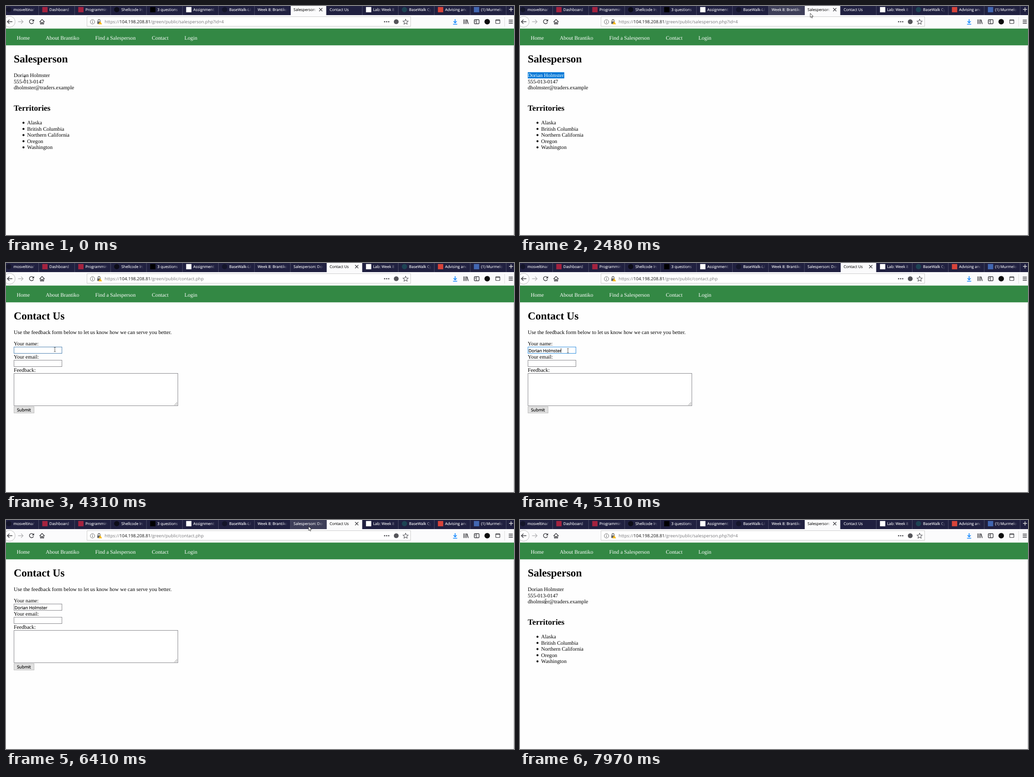
Recreate the animation shown at these times as an HTML page. Size 1113 px wide and 503 px high, loop 8000 ms.

```html
<!DOCTYPE html>
<html lang="en">
<head>
<meta charset="utf-8">
<title>Browser session</title>
<style>
  html, body { margin: 0; width: 100%; height: 100%; overflow: hidden; background: #fefefe; }
  svg { display: block; text-rendering: geometricPrecision; }
  .ui { font-family: "Open Sans", "Noto Sans", sans-serif; }
  .form { font-size: 9.25px; stroke: #000; stroke-width: .2; }
  .page { font: 11.73px "Liberation Serif", "Times New Roman", serif; }
  .h1 { font-size: 23.46px; font-weight: bold; }
  .h2 { font-size: 17.6px; font-weight: bold; }
  .line { fill: none; stroke: #38383d; stroke-width: 1.4; }
</style>
</head>
<body>
<svg width="1113" height="503" viewBox="0 0 1113 503">
  <defs>
    <linearGradient id="fade" gradientUnits="userSpaceOnUse" x1="60" x2="72">
      <stop stop-color="#fff"/><stop offset="1" stop-color="#fff" stop-opacity="0"/>
    </linearGradient>
    <linearGradient id="fadeActive" gradientUnits="userSpaceOnUse" x1="48" x2="57">
      <stop stop-color="#111"/><stop offset="1" stop-color="#111" stop-opacity="0"/>
    </linearGradient>
  </defs>
  <rect width="1113" height="503" fill="#fefefe"/>
  <rect width="1113" height="20" fill="#202040"/>
  <g id="tabs" class="ui" font-size="8.35"></g>
  <path d="M1102 7.5h9M1106.5 3v9" class="line" style="stroke:#ddd"/>
  <rect y="20" width="1113" height="30" fill="#fbfbfc"/>

  <!-- navigation buttons -->
  <circle cx="8" cy="34.5" r="12" fill="#fff" stroke="#bbb"/>
  <path d="M14 34.5H3M7.5 30L3 34.5L7.5 39" class="line"/>
  <path d="M26.5 34.5h11M33 30l4.5 4.5l-4.5 4.5" class="line" style="stroke:#b5b5b8"/>
  <path d="M59.6 31.4a4.6 4.6 0 1 0 .8 4.2" class="line"/>
  <path d="M61.5 29v4.7h-4.7z" fill="#38383d"/>
  <path d="M73.5 35L79 29.5L84.5 35M75.5 34v5.5h2.5v-3.5h2v3.5h2.5V34" class="line"/>

  <!-- address bar -->
  <rect x="177.5" y="23.5" width="709" height="21" fill="#fff" stroke="#ccc"/>
  <circle cx="189.5" cy="34.8" r="4.8" class="line" style="stroke:#666;stroke-width:1"/>
  <path d="M189.5 34v3.5M189.5 31.8v1.2" class="line" style="stroke:#666;stroke-width:1.2"/>
  <path d="M201.5 34v-2a2.3 2.3 0 0 1 4.6 0v2" class="line" style="stroke:#666"/>
  <rect x="200" y="34" width="7.5" height="5.5" fill="#666"/>
  <path d="M206.5 33.5l4 6.8h-8z" fill="#f6b91c"/>
  <g fill="#55555a">
    <circle cx="829.5" cy="34.5" r="1.5"/><circle cx="834" cy="34.5" r="1.5"/><circle cx="838.5" cy="34.5" r="1.5"/>
    <circle cx="855" cy="34.5" r="5.3"/>
  </g>
  <path d="M875.5 29l1.7 3.7l4 .5l-3 2.7l.8 4l-3.5-2l-3.5 2l.8-4l-3-2.7l4-.5z" class="line" style="stroke:#55555a;stroke-width:1.1"/>
  <g id="address" class="ui" font-size="9.61"></g>

  <!-- toolbar buttons -->
  <path d="M984 29v7.5M980.5 33.5l3.5 3.5l3.5-3.5M979.5 40h9" class="line" style="stroke:#0a84ff;stroke-width:1.6"/>
  <path d="M1003 29.5v10M1006 29.5v10M1009 29.5v10M1010 30l3 9.5" class="line"/>
  <rect x="1026" y="30" width="10.5" height="9" rx="1.5" class="line"/>
  <path d="M1030.8 30v9M1027.5 32.5h2M1027.5 34.8h2" class="line" style="stroke-width:1.1"/>
  <circle cx="1054.3" cy="34.5" r="6" fill="#0c0c0d"/>
  <rect x="1073" y="30" width="9" height="8.5" rx="1" class="line" style="stroke-width:1.2"/>
  <path d="M1073 31.5h9" class="line"/>
  <path d="M1092.5 24v21" stroke="#ddd"/>
  <path d="M1101.5 31h9M1101.5 34.5h9M1101.5 38h9" class="line"/>

  <rect y="49.6" width="1113" height="36.8" fill="#338844"/>
  <g id="menu" class="page" fill="#fff"></g>
  <g id="content" class="page"></g>
  <path d="M1112.5 86.4V503" stroke="#c9c9cc"/>
  <g id="cursor"></g>
</svg>
<script>
const LOOP = 8000;
const PERSON = 'Dorian Holmster';
const TAB_WIDTH = 78.8, TAB_ORIGIN = -7.3;
const SALES_TAB = 8, CONTACT_TAB = 9;

// Title, icon colour, icon shape
const TABS = [
  ['mosveltina/', '#14152a', 'circle'], ['Dashboard', '#a5233f', 'square'],
  ['Programming', '#a5233f', 'square'], ['Shellcode Inj', '#0d0d18', 'circle'],
  ['3 questions t', '#000', 'square'], ['Assignment: W', '#fff', 'square'],
  ['BaseWalk-Lib', '#14152a', 'circle'], ['Week 8: Brantiko'],
  ['Salesperson: Dorian'], ['Contact Us'],
  ['Lab: Week 8:', '#fff', 'square'], ['BaseWalk Cy', '#1d4454', 'circle'],
  ['Advising and', '#d8443a', 'square'], ['(1) Murmelon', '#4267b2', 'square'],
  ['']
];

// Time, pointer x, pointer y, pointer shape, hovered tab
const POINTER = [
  [0, 41, 158.5, 'beam'], [130, 34, 158], [260, 26, 157], [390, 20, 156], [520, 17.5, 155],
  [780, 42, 154], [910, 79, 153.5], [1040, 87, 155], [1170, 89, 158],
  [1430, 96, 157], [1560, 102, 156],
  [2220, 240, 110, 'arrow'], [2350, 575, 12, 'arrow', 7], [2480, 636, 16, 'arrow', 7],
  [2610, 850, 14, 'arrow', 10], [2740, 998, 20, 'arrow', 12], [2870, 890, 10, 'arrow', 11],
  [3000, 750, 8, 'arrow', 9], [3130, 742, 8, 'arrow'],
  [3260, 640, 45, 'arrow'], [3390, 430, 108, 'arrow'], [3520, 240, 160, 'arrow'],
  [3650, 145, 180, 'arrow'], [3780, 110, 187, 'beam'],
  [4310, 107, 190, 'beam'], [4440, 105, 192.5, 'beam'],
  [5630, 190, 150, 'arrow'], [5760, 420, 95, 'arrow'], [5890, 700, 40, 'arrow'],
  [6020, 950, 24, 'arrow'], [6150, 1050, 18, 'arrow'], [6280, 820, 10, 'arrow', 10],
  [6410, 663, 14, 'arrow', 8], [6540, 663, 14, 'arrow'],
  [6800, 260, 130, 'arrow'], [6930, 2, 228, 'arrow'],
  [7190, 5, 220, 'arrow'], [7320, 9, 206, 'arrow'], [7450, 13, 190, 'arrow'],
  [7580, 19, 181, 'beam'], [7840, 38, 180, 'beam'], [7970, 56, 178.5, 'beam']
];

// Time and right edge of the text selection
const SELECTION = [[0, 17], [780, 26], [910, 66], [1040, 84], [1170, 90], [1560, 97], [7840, 17]];

const byId = id => document.getElementById(id);
const latest = (steps, t) => steps.filter(step => step[0] <= t).pop();
const text = (x, y, s, attrs = '') => `<text x="${x}" y="${y}" ${attrs}>${s}</text>`;
const box = (x, y, w, h, fill, stroke = 'none') =>
  `<rect x="${x}" y="${y}" width="${w}" height="${h}" fill="${fill}" stroke="${stroke}"/>`;

function drawTabs(active, hovered) {
  return TABS.map(([title, colour, shape], i) => {
    const isActive = i === active;
    const icon = shape === 'circle' ? `<circle cx="13.5" cy="8" r="5.8" fill="${colour}"/>`
      : shape ? box(8, 2.2, 11.6, 11.6, colour) : '';
    const back = isActive ? box(0.7, 0, TAB_WIDTH - 0.7, 20, '#fbfbfc')
      : i === hovered ? box(0, 0, TAB_WIDTH, 20, '#3d3e58') : '';
    const close = isActive
      ? '<path d="M63 4.5l7 7M70 4.5l-7 7" class="line" style="stroke-width:1.2"/>' : '';
    const edge = isActive ? '' : box(-0.4, 0, 0.8, 20, '#5b5c74');
    const ink = `url(#fade${isActive ? 'Active' : ''})`;
    return `<g transform="translate(${TAB_ORIGIN + TAB_WIDTH * i})">${back}${edge}${icon}${close}` +
      text(shape ? 23.6 : 7, 11.2, title, `fill="${ink}" stroke="${ink}" stroke-width=".12"`) + '</g>';
  }).join('');
}

function drawAddress(file) {
  return text(216, 38.3,
    `https://<tspan fill="#111">104.198.208.81</tspan>/green/public/${file}`, 'fill="#77777a"');
}

function drawSalesPage(selectionEnd) {
  const lines = [PERSON, '555-013-0147', 'dholmster@traders.example'];
  const places = ['Alaska', 'British Columbia', 'Northern California', 'Oregon', 'Washington'];
  const width = selectionEnd - 17;
  return text(17, 124, 'Salesperson', 'class="h1"') +
    lines.map((s, i) => text(17, 156.2 + 13.5 * i, s)).join('') +
    `<clipPath id="selected">${box(17, 145.5, width, 13.5, '#000')}</clipPath>` +
    box(17, 145.5, width, 13.5, '#0078d7') +
    text(17, 156.2, PERSON, 'fill="#fff" clip-path="url(#selected)"') +
    text(17, 230, 'Territories', 'class="h2"') +
    places.map((s, i) => {
      const y = 260 + 13.5 * i;
      return `<circle cx="38.3" cy="${y - 3.5}" r="2.2"/>` + text(46.3, y, s);
    }).join('');
}

function drawContactPage(t) {
  const grey = '#85858a';
  const focused = t >= 4310 && t < 6410;
  const border = !focused ? grey : t < 4440 ? '#4b80b0' : '#2a8cdd';
  const filled = t >= 5110;
  const caretOn = t >= 4710 && t < 5500;
  return text(17, 124, 'Contact Us', 'class="h1"') +
    text(17, 156.2, 'Use the feedback form below to let us know how we can serve you better.') +
    text(17, 181.3, 'Your name:') + box(17.5, 184.5, 105, 14, '#fff', border) +
    text(17, 210, 'Your email:') + box(17.5, 213.5, 105, 14, '#fff', grey) +
    text(17, 238.8, 'Feedback:') + box(17.5, 242.5, 359, 71, '#fff', grey) +
    '<path d="M374 306v6M371.5 308.5v3.5M369 311v1" stroke="#777" stroke-width="1.3" stroke-dasharray="1.3"/>' +
    box(17.5, 315.5, 44, 14, '#e1e1e1', '#bcbcbc') +
    '<g class="ui form">' + text(24, 326.2, 'Submit') +
    (filled ? text(18.8, 195.6, PERSON) : '') + '</g>' +
    (caretOn ? box(filled ? 89.5 : 19.5, 187, 0.8, 10, '#000') : '');
}

function drawCursor([, x, y, shape = 'beam']) {
  const outline = shape === 'beam'
    ? '<path d="M-2-4.7h1.5l.5.5l.5-.5h1.5M0-4.2v8.4M-2 4.7h1.5l.5-.5l.5.5h1.5" fill="none" stroke="#222" stroke-width=".75"/>'
    : '<path d="M0 0v9l2-1.8l1.4 3.3l1.5-.7l-1.4-3.2h2.9z" fill="#fff" stroke="#222" stroke-width=".8"/>';
  return `<g transform="translate(${x} ${y})">${outline}</g>`;
}

byId('menu').innerHTML = [
  [23.5, 'Home'], [87, 'About Brantiko'], [195.5, 'Find a Salesperson'], [319.5, 'Contact'], [391, 'Login']
].map(([x, label]) => text(x, 73.6, label)).join('');

const shown = {};
function show(id, markup) {
  if (shown[id] !== markup) byId(id).innerHTML = shown[id] = markup;
}

function frame(now) {
  const t = now % LOOP;
  const pointer = latest(POINTER, t);
  const onContact = t >= 3130 && t < 6540;
  show('tabs', drawTabs(onContact ? CONTACT_TAB : SALES_TAB, pointer[4]));
  show('address', drawAddress(onContact ? 'contact.php' : 'salesperson.php?id=4'));
  show('content', onContact ? drawContactPage(t) : drawSalesPage(latest(SELECTION, t)[1]));
  show('cursor', drawCursor(pointer));
  requestAnimationFrame(frame);
}
frame(performance.now());
</script>
</body>
</html>
```
